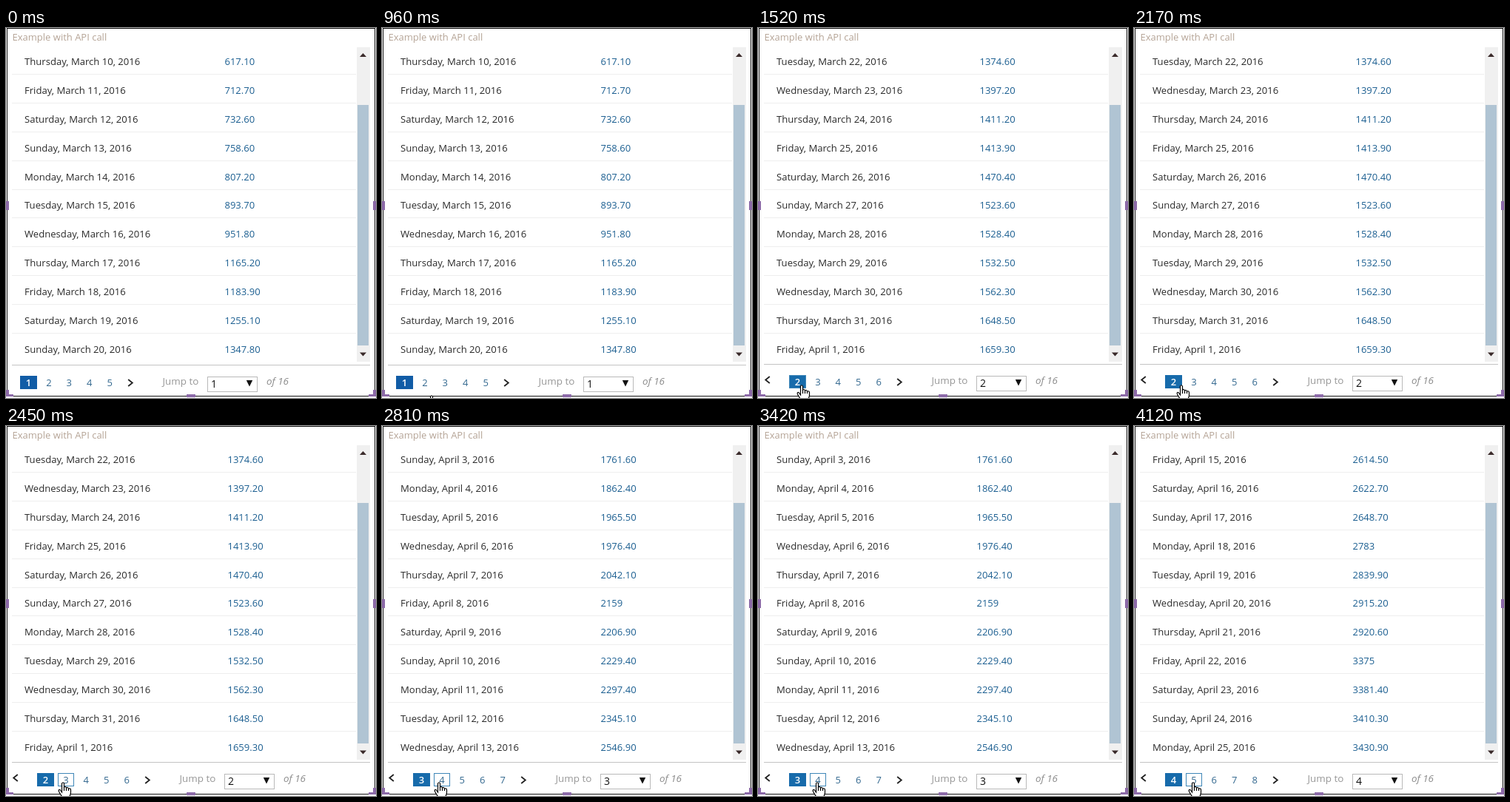
These frames come from a looping animation (500 px wide and 500 px high, 5240 ms). An HTML page with a canvas:

```html
<!DOCTYPE html>
<html lang="en">
<head>
<meta charset="utf-8">
<title>Paged table</title>
<style>
  html, body { margin: 0; width: 100%; height: 100%; overflow: hidden; background: #fff; }
  canvas { display: block; width: 500px; height: 500px; }
</style>
</head>
<body>
<canvas id="stage" width="500" height="500"></canvas>
<script>
const ctx = document.getElementById('stage').getContext('2d');
const LOOP = 5240;
const FONT = '"Open Sans", "Noto Sans", sans-serif';
const DAY = 86400000;
const FIRST_DAY = Date.UTC(2016, 2, 10);
const PAGE_STARTS = [0, 1520, 2810, 4120];
const ROW_STEP = 38.88;
const BUTTON_STEP = 27.4;

const VALUES = [
  [617.1, 712.7, 732.6, 758.6, 807.2, 893.7, 951.8, 1165.2, 1183.9, 1255.1, 1347.8],
  [1374.6, 1397.2, 1411.2, 1413.9, 1470.4, 1523.6, 1528.4, 1532.5, 1562.3, 1648.5, 1659.3],
  [1761.6, 1862.4, 1965.5, 1976.4, 2042.1, 2159, 2206.9, 2229.4, 2297.4, 2345.1, 2546.9],
  [2614.5, 2622.7, 2648.7, 2783, 2839.9, 2915.2, 2920.6, 3375, 3381.4, 3410.3, 3430.9]
];

const dateFormat = new Intl.DateTimeFormat('en-US', {
  weekday: 'long', month: 'long', day: 'numeric', year: 'numeric', timeZone: 'UTC'
});

function rect(x, y, w, h, color) {
  ctx.fillStyle = color;
  ctx.fillRect(x, y, w, h);
}

function outline(x, y, w, h, color) {
  ctx.strokeStyle = color;
  ctx.lineWidth = 1;
  ctx.strokeRect(x + 0.5, y + 0.5, w - 1, h - 1);
}

function text(str, x, y, color, { align = 'left', style = '', size = 13 } = {}) {
  ctx.font = `${style} ${size}px ${FONT}`;
  ctx.textAlign = align;
  ctx.fillStyle = color;
  ctx.fillText(str, x, y);
}

function triangle(x, y, halfWidth, height, color) {
  ctx.fillStyle = color;
  ctx.beginPath();
  ctx.moveTo(x - halfWidth, y);
  ctx.lineTo(x + halfWidth, y);
  ctx.lineTo(x, y + height);
  ctx.fill();
}

function chevron(x, y, direction) {
  ctx.strokeStyle = '#222';
  ctx.lineWidth = 1.8;
  ctx.beginPath();
  ctx.moveTo(x - 2.8 * direction, y - 4.5);
  ctx.lineTo(x + 2.8 * direction, y);
  ctx.lineTo(x - 2.8 * direction, y + 4.5);
  ctx.stroke();
}

function drawTable(page) {
  text('Example with API call', 8.5, 17, '#b5a496');
  const valueX = page === 1 ? 299.5 : 295.5;
  VALUES[page].forEach((value, i) => {
    const offset = Math.round(i * ROW_STEP);
    const day = FIRST_DAY + (page * 12 + i) * DAY;
    text(dateFormat.format(day), 25, 50 + offset, '#2b2b2b', { size: 13.1 });
    const label = Number.isInteger(value) ? String(value) : value.toFixed(2);
    text(label, valueX, 50 + offset, '#1c5f91');
    if (i < 10) rect(8, 62 + offset, 465, 1, '#eeeeee');
  });
}

function drawScrollbar() {
  rect(474, 26, 18, 425, '#f0f0f0');
  rect(475, 104, 15, 325, '#b0c4d3');
  triangle(482.5, 39, 4.5, -5, '#3a2a2a');
  triangle(482.5, 438.5, 4.5, 5, '#3a2a2a');
}

function drawPager(page, pointer) {
  const dx = page ? 23 : 0;
  const dy = page ? -1 : 0;
  const top = 470 + dy;
  rect(8, 455 + dy, 484, 1, '#c4c4c4');
  if (page) chevron(13, 475.5, -1);

  for (let i = 0; i < 5; i++) {
    const center = 30.5 + dx + i * BUTTON_STEP;
    const left = Math.ceil(center - 11.5);
    const tipX = pointer ? pointer.x + 7 : -1;
    const hovered = pointer && tipX >= left && tipX < left + 22 && pointer.y < top + 18;
    if (i === 0) rect(left, top, 23, 18, page ? '#176bab' : '#115ca6');
    if (hovered) outline(left, top, i ? 22 : 23, 18, '#3f87b8');
    text(page + i + 1, center, 484 + dy, i ? '#33688f' : '#fff',
      { align: 'center', style: i ? '' : '600' });
  }

  chevron(168 + dx, 479.5 + dy, 1);
  text('Jump to', 211.5 + dx, 482 + dy, '#979797', { size: 13.4 });
  outline(272 + dx, 471 + dy, 68, 21, '#b9b9b9');
  text(page + 1, 277 + dx, 486 + dy, '#111', { size: 14 });
  triangle(329 + dx, 476 + dy, 4.2, 8.5, '#111');
  text('of 16', 352 + dx, 482 + dy, '#8c8c8c', { style: 'italic', size: 13.4 });
}

function drawFrame() {
  outline(1, 0, 498, 498, '#111');
  const purple = '#8c6aa8';
  for (const x of [0, 496]) {
    rect(x, 234, 4, 12, purple);
    rect(x, 489, 4, 9, purple);
  }
  rect(0, 495, 10, 3, purple);
  rect(490, 495, 10, 3, purple);
  rect(244, 495, 12, 4, purple);
}

function drawHand({ x, y }) {
  ctx.save();
  ctx.translate(x, y);
  ctx.beginPath();
  ctx.moveTo(5.5, 14);
  ctx.lineTo(5.5, 2);
  ctx.quadraticCurveTo(7, -0.5, 8.5, 2);
  ctx.lineTo(8.5, 7);
  ctx.quadraticCurveTo(10.5, 5.5, 11.5, 8);
  ctx.quadraticCurveTo(13.5, 6.5, 14.5, 9);
  ctx.quadraticCurveTo(17.5, 8, 17.5, 11);
  ctx.lineTo(17.5, 15);
  ctx.lineTo(15.5, 21.5);
  ctx.lineTo(6.5, 21.5);
  ctx.lineTo(1.5, 13);
  ctx.quadraticCurveTo(0.5, 10, 3, 10.5);
  ctx.closePath();
  ctx.fillStyle = '#fff';
  ctx.fill();
  ctx.strokeStyle = '#000';
  ctx.lineWidth = 1.2;
  ctx.stroke();
  ctx.beginPath();
  for (const [fx, fy] of [[8.5, 7], [11.5, 8], [14.5, 9]]) {
    ctx.moveTo(fx, fy);
    ctx.lineTo(fx, 12);
  }
  ctx.stroke();
  ctx.restore();
}

// Progress of a move made of equal jumps, the first one at its start.
function stepped(t, start, end, steps) {
  const jump = (end - start) / (steps - 1);
  const done = Math.floor((t - start) / jump + 1e-6) + 1;
  return Math.max(0, Math.min(steps, done)) / steps;
}

function pointerAt(t) {
  if (t < 960) return null;
  const enter = stepped(t, 960, 1140, 4);
  const slide = stepped(t, 2070, 2450, 8);
  const nudge = (t >= 3240 ? 1 : 0) + (t >= 3420 ? 2 : 0);
  return {
    x: Math.round(52 + 10 * (1 - enter) + 18 * slide) + nudge,
    y: Math.round(482 + 18 * (1 - enter) - slide)
  };
}

function draw(now) {
  const t = now % LOOP;
  const page = PAGE_STARTS.filter(start => t >= start).length - 1;
  const pointer = pointerAt(t);
  rect(0, 0, 500, 500, '#fff');
  drawTable(page);
  drawScrollbar();
  drawPager(page, pointer);
  drawFrame();
  if (pointer) drawHand(pointer);
}

let startTime;
function tick(now) {
  startTime ??= now;
  draw(now - startTime);
  requestAnimationFrame(tick);
}
draw(0);
requestAnimationFrame(tick);
</script>
</body>
</html>
```
